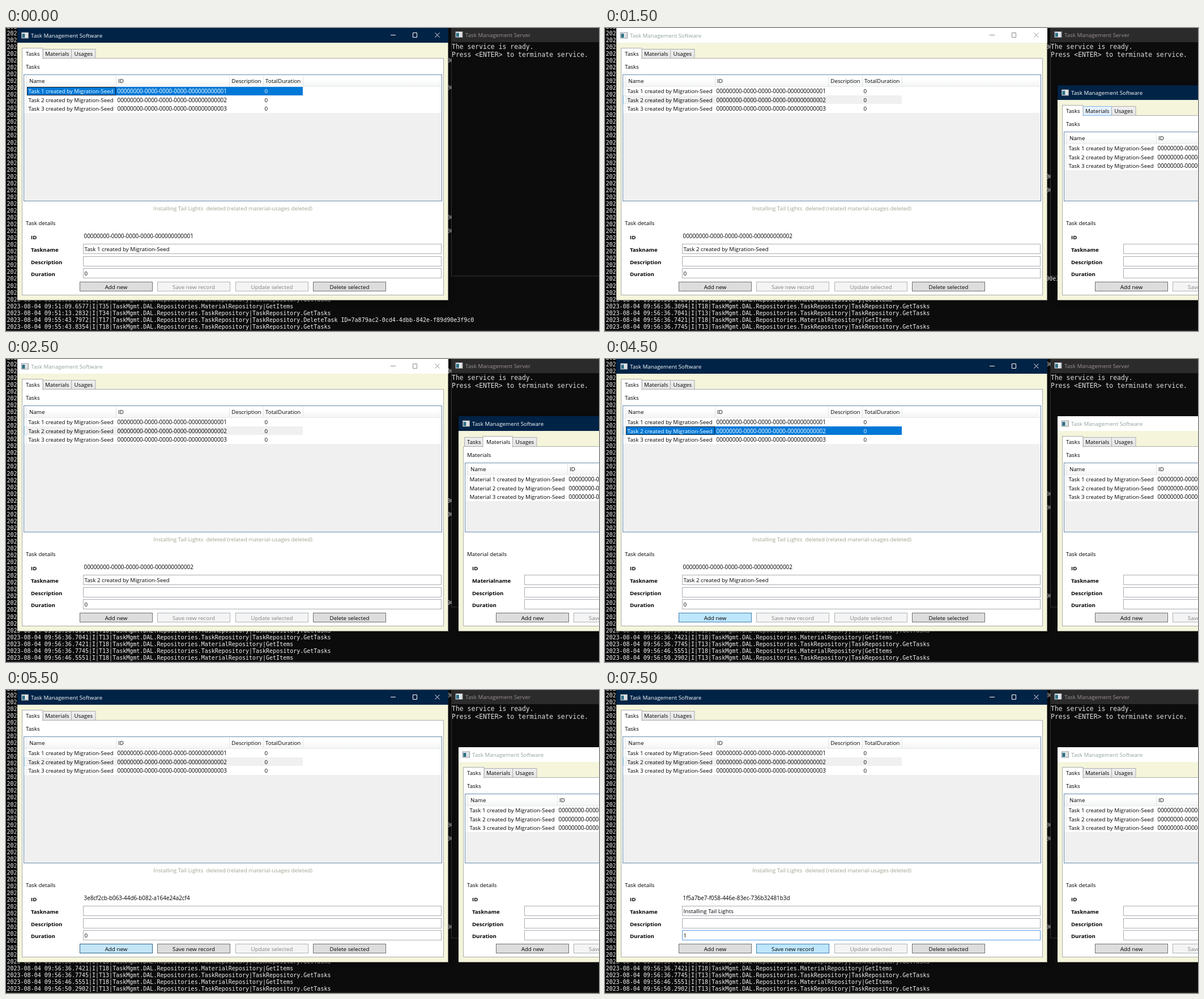
Recreate the animation shown at these times as an HTML page. Size 1047 by 535 pixels, loop 8000 ms.

```html
<!DOCTYPE html>
<html lang="en">
<head>
<meta charset="utf-8">
<title>Task management demo</title>
<style>
  html, body { margin: 0; width: 100%; height: 100%; overflow: hidden; background: #0c0c0c; }
  svg { display: block; width: 1047px; height: 535px; }
  text { font: 9.8px "Open Sans", "Noto Sans", sans-serif; white-space: pre; }
  .id { font-size: 9.9px; }
  .label { font-size: 9.65px; font-weight: bold; }
  .mid { text-anchor: middle; }
  .log { font: 10px "DejaVu Sans Mono", monospace; }
  .console { font: 11.44px "DejaVu Sans Mono", monospace; }
  .active { filter: drop-shadow(0 3px 5px #0008); }
</style>
</head>
<body>
<svg id="stage" viewBox="0 0 1047 535">
  <defs>
    <linearGradient id="header" x2="0" y2="1">
      <stop offset=".4" stop-color="#fff"/><stop offset="1" stop-color="#f3f4f5"/>
    </linearGradient>
    <linearGradient id="tab" x2="0" y2="1">
      <stop stop-color="#f0f0f0"/><stop offset="1" stop-color="#e5e5e5"/>
    </linearGradient>
    <linearGradient id="tabHover" x2="0" y2="1">
      <stop stop-color="#ecf4fc"/><stop offset="1" stop-color="#dcecfc"/>
    </linearGradient>
  </defs>
  <g id="log"></g>
  <g id="server"></g>
  <g id="second"></g>
  <g id="main"></g>
</svg>
<script>
const $ = id => document.getElementById(id);

const box = (x, y, w, h, fill, stroke = 'none') =>
  `<rect x="${x}" y="${y}" width="${w}" height="${h}" fill="${fill}" stroke="${stroke}"/>`;
const path = (d, stroke) => `<path d="${d}" fill="none" stroke="${stroke}"/>`;
const text = (x, y, s, fill = '#000', cls = '') =>
  `<text x="${x}" y="${y}" fill="${fill}" class="${cls}">${s}</text>`;
const icon = (x, y) => box(x, y, 12, 10, '#f4f4f4', '#8a9299') +
  box(x + 1, y + 2, 5, 7, '#2c6f86') + box(x + 8, y + 2, 3, 7, '#d5d9dc');

// Log window
const repos = { GetItems: 'MaterialRepository|', GetTasks: 'TaskRepository|TaskRepository.' };
const entry = (time, thread, call) =>
  `2023-08-04 09:${time}|I|T${thread}|TaskMgmt.DAL.Repositories.${repos[call] || repos.GetTasks}${call}`;
const zeroId = n => '00000000-0000-0000-0000-00000000000' + n;
const longLines = [14, 16, 35, 39];
const log = [];
for (let i = 60; i > 4; i--)
  log.push(entry('50:11.2040', 34, longLines.includes(i) ? 'DeleteTask ID=' + zeroId(0) : 'GetTasks'));
log.push(
  entry('51:08.8911', 34, 'GetTasks'),
  entry('51:09.6577', 35, 'GetItems'),
  entry('51:13.2832', 34, 'GetTasks'),
  entry('55:43.7972', 17, 'DeleteTask ID=7a879ac2-0cd4-4dbb-842e-f89d90e3f9c0'),
  entry('55:43.8354', 18, 'GetTasks'),
  entry('56:36.1044', 18, 'GetTasks'),
  entry('56:36.1420', 18, 'GetItems'),
  entry('56:36.3094', 18, 'GetTasks'),
  entry('56:36.7041', 13, 'GetTasks'),
  entry('56:36.7421', 18, 'GetItems'),
  entry('56:36.7745', 13, 'GetTasks'),
  entry('56:46.5551', 18, 'GetItems'),
  entry('56:50.2902', 13, 'GetTasks'));

const drawLog = pending => log.slice(0, log.length - pending).slice(-45).reverse()
  .map((line, i) => text(1.5, 530.8 - i * 12.047, line, '#f2f2f2', 'log')).join('') +
  box(0, 533.5, 1047, 1.5, '#242424');

const drawServer = () =>
  box(786.5, -1, 270, 439, '#0c0c0c', '#363636') + box(786, 0, 261, 25, '#2b2b2b') +
  icon(794, 6.5) + text(811, 15.5, 'Task Management Server', '#9c9390') +
  text(787, 36.5, 'The service is ready.', '#dedede', 'console') +
  text(787, 50.5, 'Press &lt;ENTER> to terminate service.', '#dedede', 'console');

// Client window
const tabs = [['Tasks', 30.5, 34.5, 35], ['Materials', 65, 50.5, 69], ['Usages', 115.5, 42.5, 120.5]];
const buttonNames = ['Add new', 'Save new record', 'Update selected', 'Delete selected'];
const buttonStyles = {
  normal: ['#ddd', '#707070', '#000'],
  off: ['#f4f4f4', '#adb2b5', '#838383'],
  hover: ['#bee6fd', '#3c7fb1', '#000'],
  pressed: ['#c4e5f6', '#2c628b', '#000']
};

function drawTab([name, x, w, textX], dy, selected, hover) {
  const shape = selected ? box(x - 2, 35.5 + dy, w + 2, 19, '#fff', '#acacac') +
      box(x - 1.5, 53 + dy, w + 1, 3, '#fff')
    : box(x, 37.5 + dy, w, 16, hover ? 'url(#tabHover)' : 'url(#tab)', hover ? '#7eb4ea' : '#acacac');
  return shape + text(textX, 48.5 + dy, name);
}

function drawTable({ dy, noun, nameWidth, marked, selected, marker }) {
  const idX = 37 + nameWidth, rest = nameWidth - 157;
  const edges = [36.5, ...[194.5, 394.5, 454.5, 524.5].map(x => x + rest)];
  let out = box(31.5, 82.5 + dy, 738, 223 - dy, '#f0f0f0', '#688caf') +
    box(32, 83 + dy, 737, 67, '#fff') + box(32, 83 + dy, 737, 20, 'url(#header)') +
    path(edges.map(x => `M${x} ${84 + dy}v19`).join(''), '#e0e3e6') +
    path(`M32 ${103.5 + dy}H769M36.5 ${103 + dy}v47`, '#e9ebed');
  [['Name', 41], ['ID', 198 + rest], ['Description', 398.3 + rest], ['TotalDuration', 458 + rest]]
    .forEach(([name, x]) => out += text(x, 97 + dy, name));
  for (let n = 1; n <= 3; n++) {
    const y = Math.round(88 + n * 15.5) + dy, on = n === marked && selected;
    if (n === marked) out += box(37, y, 487, 15, on ? '#0078d7' : '#f0f0f0');
    if (n === marked && marker) out += path(`M36 ${y + .5}H32.5V${y + 14.5}H36`, '#b4e4f5');
    if (on) out += box(37.5, y + .5, 156, 14, 'none', '#0b1f33');
    const ink = on ? '#fff' : '#000', base = 99.6 + n * 15.5 + dy;
    out += text(39.5, base, `${noun} ${n} created by Migration-Seed`, ink) +
      text(idX + 2.5, base, zeroId(n), ink, 'id') + text(456.5 + rest, base, 0, ink);
  }
  return out;
}

function drawForm({ noun, id, name, duration, focus, buttons, buttonShift }) {
  const field = (label, i, value) =>
    text(44, 395 + i * 21.5, label, '#000', 'label') +
    box(136.5, Math.round(381 + i * 21.5) + .5, 632, 17, '#fff', focus === i ? '#569de5' : '#abadb3') +
    text(138.5, 393.5 + i * 21.5, value);
  return text(35, 347.5, noun + ' details') + text(44, 373, 'ID', '#000', 'label') +
    text(137.5, 370.5, id, '#000', 'id') +
    field(noun + 'name', 0, name) + field('Description', 1, '') + field('Duration', 2, duration) +
    buttonNames.map((label, i) => {
      const [fill, line, ink] = buttonStyles[buttons[i]];
      const x = Math.round(130 + i * 137.4 + buttonShift) + .5;
      return box(x, 448.5, 128, 16, fill, line) + text(x + 64, 461, label, ink, 'mid');
    }).join('');
}

function drawClient(options) {
  const o = {
    dx: 0, dy: 0, noun: 'Task', nameWidth: 157, tab: 0, hoverTab: -1,
    status: '', id: '', name: '', duration: '',
    buttonShift: 0, buttons: ['normal', 'off', 'off', 'normal'], ...options
  };
  const { dx, dy, active } = o, glyph = active ? '#fff' : '#8c8c8c';
  return `<g transform="translate(${dx})" class="${active ? 'active' : ''}">` +
    box(20, dy, 761, 481 - dy, '#85857a') +
    box(20, dy, 760, 480 - dy, '#f5f5dc') +
    box(20, dy, 761, 26, active ? '#002346' : '#fff') +
    icon(27.5, 8 + dy) +
    text(44, 16.5 + dy, 'Task Management Software', active ? '#fff' : '#8fa39c') +
    path(`M679 ${12.5 + dy}h9M718.5 ${8.5 + dy}h7v8h-7zM757.5 ${8.5 + dy}l8 8m0-8l-8 8`, glyph) +
    box(28.5, 53.5 + dy, 744, 418 - dy, '#fff', '#acacac') +
    tabs.map((t, i) => i === o.tab ? '' : drawTab(t, dy, false, i === o.hoverTab)).join('') +
    drawTab(tabs[o.tab], dy, true) +
    text(35, 71.5 + dy, tabs[o.tab][0]) +
    drawTable(o) +
    text(400.5, 321.5, o.status, '#a2a28e', 'mid') +
    drawForm(o) + '</g>';
}

function mainState(step) {
  const task = step ? 2 : 1;
  const state = {
    active: step === 0 || step >= 4,
    marked: task, marker: step > 0, selected: step === 0 || step === 4 || step === 5,
    status: 'Installing Tail Lights  deleted (related material-usages deleted)',
    id: zeroId(task), name: `Task ${task} created by Migration-Seed`, duration: 0
  };
  if (step === 5) state.buttons = ['hover', 'off', 'off', 'normal'];
  if (step === 6) Object.assign(state, {
    id: '3e8cf2cb-b063-44d6-b082-a164e24a2cf4', name: '',
    buttons: ['pressed', 'normal', 'off', 'normal']
  });
  if (step >= 7) Object.assign(state, {
    id: '1f5a7be7-f058-446e-83ec-736b32481b3d', name: 'Installing Tail Lights',
    duration: step === 8 ? 1 : 0, focus: step === 8 ? 2 : 0,
    buttons: ['normal', step === 8 ? 'hover' : 'normal', 'off', 'normal']
  });
  return state;
}

function secondState(step) {
  const page = step === 3 ? { tab: 1, noun: 'Material', nameWidth: 175 } : {};
  return { dx: 779, dy: 101, buttonShift: -44, active: step < 4, hoverTab: step === 2 ? 1 : -1, ...page };
}

let shown = -1;
function tick(now) {
  const step = Math.floor((now % 8000 + 500) / 1000);
  if (step !== shown) {
    shown = step;
    $('log').innerHTML = drawLog(step < 2 ? 8 : Math.max(0, 4 - step));
    $('second').innerHTML = step < 2 ? '' : drawClient(secondState(step));
    $('main').innerHTML = drawClient(mainState(step));
  }
  requestAnimationFrame(() => tick(performance.now() - start));
}

$('server').innerHTML = drawServer();
const start = performance.now();
tick(0);
</script>
</body>
</html>
```
